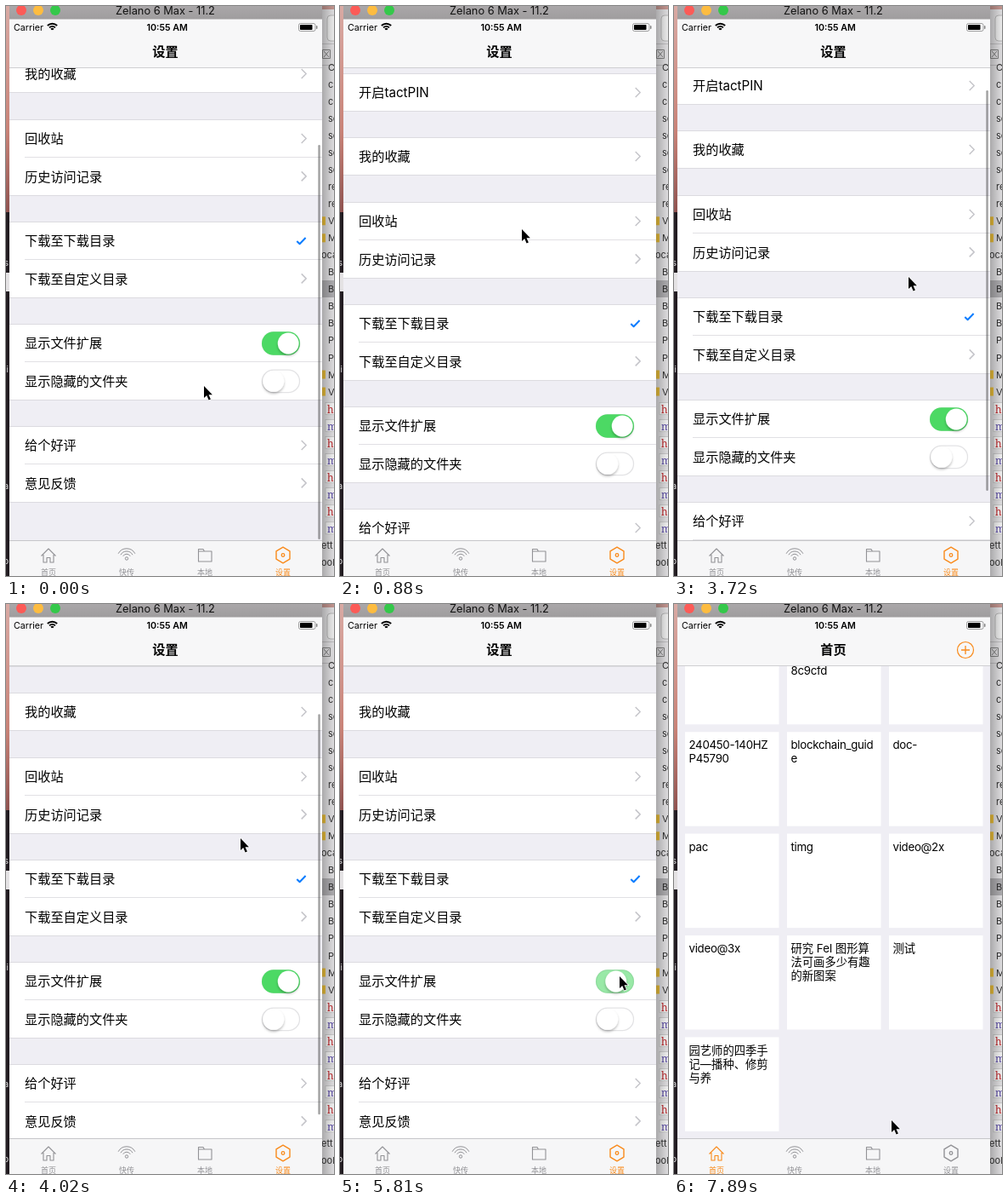
An HTML page for the animation above (8 s loop, 386 by 669 pixels).

```html
<!DOCTYPE html>
<html lang="zh-CN">
<head>
<meta charset="utf-8">
<title>设置</title>
<style>
html, body { margin: 0; width: 100%; height: 100%; overflow: hidden; background: #efeff4; }
svg { display: block; width: 386px; height: 669px; font-family: Inter, "Noto Sans CJK SC", "Noto Sans CJK", sans-serif; }
text { white-space: pre; }
.line { fill: none; stroke: currentColor; stroke-linejoin: round; }
</style>
</head>
<body>
<svg id="stage" viewBox="0 0 386 669">
  <defs>
    <linearGradient id="wall" x2="0" y2="1">
      <stop offset="0" stop-color="#d9aaa4"/><stop offset=".6" stop-color="#c98378"/><stop offset="1" stop-color="#8f5350"/>
    </linearGradient>
    <linearGradient id="shade">
      <stop offset="0" stop-opacity=".26"/><stop offset="1" stop-opacity=".04"/>
    </linearGradient>
    <linearGradient id="bar" x2="0" y2="1">
      <stop offset="0" stop-color="#aaa7a9"/><stop offset="1" stop-color="#9f9d9e"/>
    </linearGradient>
    <filter id="drop" x="-40%" y="-40%" width="180%" height="190%">
      <feDropShadow dx="0" dy="2" stdDeviation="1.6" flood-opacity=".28"/>
    </filter>
  </defs>
</svg>
<script>
const stage = document.getElementById('stage');
const ORANGE = '#f98a1a', GREY = '#929296', LOOP = 8000, TICK = 148.9;

const rect = (x, y, w, h, fill, extra = '') =>
  `<rect x="${x}" y="${y}" width="${w}" height="${h}" fill="${fill}" ${extra}/>`;
const circle = (x, y, r, fill, extra = '') =>
  `<circle cx="${x}" cy="${y}" r="${r}" fill="${fill}" ${extra}/>`;
const text = (x, y, size, str, extra = '') =>
  `<text x="${x}" y="${y}" font-size="${size}" ${extra}>${str}</text>`;
const line = (d, width, color = '') =>
  `<path class="line" d="${d}" stroke-width="${width}" ${color && `color="${color}"`}/>`;
const middle = 'text-anchor="middle"';

// Concentric arcs opening upwards
const arcs = (x, y, radii, angle, width) => radii.map(r => {
  const dx = r * Math.sin(angle), top = y - r * Math.cos(angle);
  return line(`M${x - dx} ${top}A${r} ${r} 0 0 1 ${x + dx} ${top}`, width);
}).join('');

function desktop() {
  let out = rect(0, 0, 5, 242, 'url(#wall)') + rect(0, 242, 5, 427, '#231d22')
    + rect(0, 313, 4, 22, '#e4e2e4');
  [['os', 305], ['ii', 430], ['a', 567], ['b', 655]].forEach(([s, y]) =>
    out += text(3, y, 10, s, 'fill="#ddd" text-anchor="end"'));

  out += rect(372, 0, 14, 669, '#e6e5e7') + rect(372, 0, 14, 4, '#c99a94')
    + rect(378, 11, 20, 30, '#f3f3f3', 'rx="4" stroke="#bbb"')
    + line('M372 44.5H386M372 69.5H386', 1, '#c4c3c5')
    + line('M372.5 51.5h9v10h-9zM374 53l6 7M380 53l-6 7', 1, '#858585')
    + rect(372, 322, 14, 20, '#b2b1b4');
  const names = 'C c cc sc so so so re re /V /M oca B B B B P P /M /V h m h m h m h m ett ool'.split(' ');
  names.forEach((name, i) => {
    const y = 76 + i * 20.03;
    if (name === 'h' || name === 'm') {
      out += rect(376, y - 11, 12, 14, '#fafafa', 'stroke="#bbb" stroke-width=".6"')
        + text(378, y + 1, 12, name, `fill="${name === 'h' ? '#c3272b' : '#5a4aa8'}" font-family="Noto Serif, serif"`);
    } else {
      const folder = name[0] === '/';
      if (folder) out += rect(370, y - 9, 6, 10, '#f2c53d');
      out += text(name.length > 2 ? 371 : 379, y, 11, folder ? name[1] : name, 'fill="#333"');
    }
  });
  return out + rect(372, 0, 14, 669, 'url(#shade)');
}

function toggle(y, id) {
  return `<g id="${id}">`
    + rect(301.5, y - 13.3, 44, 26.6, '#fff', 'rx="13.3" stroke="#e3e3e5" stroke-width="1.3"')
    + rect(301, y - 13.8, 45, 27.6, '#4cd964', 'rx="13.8" class="fill"')
    + circle(0, y, 12.4, '#fff', 'class="knob" filter="url(#drop)"') + '</g>';
}

function settings() {
  const groups = [
    [79, '开启tactPIN'], [154, '我的收藏'], [230, '回收站', '历史访问记录'],
    [350, '下载至下载目录', '下载至自定义目录'],
    [470, '显示文件扩展', '显示隐藏的文件夹'], [590, '给个好评', '意见反馈']
  ];
  let out = '';
  groups.forEach(([top, ...rows]) => {
    const height = Math.round(rows.length * 44.4);
    out += rect(4, top, 368, height, '#fff')
      + rect(4, top, 368, 1, '#dcdbe0') + rect(4, top + height, 368, 1, '#dcdbe0');
    rows.forEach((name, i) => {
      const y = top + 22.5 + 44.4 * i;
      out += text(22, y + 5.8, 15.2, name);
      if (i) out += rect(22, top + 44, 350, 1, '#e1e0e4');
      if (top === 470) out += toggle(y + .5, i ? 'hidden' : 'ext');
      else if (top === 350 && !i) out += line(`M342.3 ${y + .5}l3.3 3.3 7-7.3`, 2, '#0a7cff');
      else out += line(`M347.7 ${y - 5.5}l5.5 5.5-5.5 5.5`, 1.5, '#c5c5ca');
    });
  });
  return out;
}

function home() {
  const files = [
    [], ['', '', '8c9cfd'], [],
    ['240450-140HZ', 'P45790'], ['blockchain_guid', 'e'], ['doc-'],
    ['pac'], ['timg'], ['video@2x'],
    ['video@3x'], ['研究 Fel 图形算', '法可画多少有趣', '的新图案'], ['测试'],
    ['园艺师的四季手', '记—播种、修剪', '与养']
  ];
  return files.map((lines, i) => {
    const x = 13 + i % 3 * 120, y = 30.8 + Math.floor(i / 3) * 119.4;
    return rect(x, y, 110.5, 110.5, '#fff') + lines.map((str, k) =>
      text(x + 4.5, y + 20.2 + k * 16, 13.3, str, /^[ -~]+$/.test(str) ? 'letter-spacing="-.3"' : '')).join('');
  }).join('');
}

function chrome() {
  let out = rect(4, 15, 368, 57, '#f7f7f8') + rect(4, 72, 368, 1, '#cfcfd2')
    + rect(4, 0, 368, 15.5, 'url(#bar)');
  ['#fc5b57', '#fdbc40', '#34c84a'].forEach((fill, i) => out += circle(18 + 20 * i, 5, 6, fill));
  out += text(187.5, 10, 12.8, 'Zelano 6 Max - 11.2', middle + ' fill="#111"')
    + text(9, 29, 10.7, 'Carrier')
    + arcs(54.5, 29, [2, 5, 8.2], .76, 2)
    + text(189.7, 29, 10.7, '10:55 AM', middle + ' font-weight="600"')
    + rect(344.5, 20.5, 19.5, 9, 'none', 'rx="2" stroke="#888" stroke-width=".8"')
    + rect(346, 22, 14.5, 6, '#000', 'rx=".8"') + rect(365, 23, 1.5, 4, '#888', 'rx=".7"')
    + text(187.5, 59.4, 15.2, '', middle + ' font-weight="700" id="title"')
    + `<g id="add" color="${ORANGE}">` + line('M338 54h10M343 49v10', 1.3)
    + circle(343, 54, 9.5, 'none', 'stroke="currentColor" stroke-width="1.2"') + '</g>'
    + rect(4, 628, 368, 41, '#f6f6f7') + rect(4, 627, 368, 1, '#c6c6c9');

  const tabs = [
    ['首页', line('M41.5 645.5L50 637l8.5 8.5M44 644v9h4v-5.5h4v5.5h4v-9', 1.1)],
    ['快传', arcs(142, 648, [11.2, 8, 4.8], 1.08, 1) + circle(142, 648.5, 1.7, 'none', 'stroke="currentColor"')],
    ['本地', line('M226.5 652v-14.5h5.5l1.5 2.5h8.5v12zM226.5 640h7', 1.1)],
    ['设置', line('M326 635.2l8 4.7v9.2l-8 4.7-8-4.7v-9.2z', 1.4)
      + circle(326, 644.5, 1.8, 'none', 'stroke="currentColor" stroke-width="1.3"')]
  ];
  tabs.forEach(([name, icon], i) =>
    out += `<g class="tab">${icon}${text(50 + 92 * i, 668, 9, name, middle + ' fill="currentColor" font-weight="500"')}</g>`);
  return out;
}

stage.insertAdjacentHTML('beforeend', desktop() + rect(4, 0, 368, 669, '#efeef4')
  + `<g id="settings"><g id="list">${settings()}</g>${rect(367.3, 0, 2.5, 0, '#000', 'rx="1.2" id="scroller"')}</g>`
  + `<g id="home">${home()}</g>` + chrome()
  + '<path id="cursor" d="M0 0v14l3.2-3 2.4 5.6 2.3-1-2.4-5.4h4.4z" stroke="#fff" stroke-width="1.3" paint-order="stroke"/>');

// Keys: [tick, value, ...]
const cursorKeys = [
  [0, 233, 446], [1, 236, 472], [2, 237, 481], [3, 237, 478], [6, 214, 262], [8, 209, 133],
  [9, 220, 158], [10, 226, 168], [16, 226, 168], [17, 226, 170], [18, 226, 183], [19, 226, 183],
  [20, 247, 262], [21, 276, 334], [24, 276, 334], [25, 276, 318], [26, 276, 288], [27, 276, 275],
  [28, 279, 284], [30, 312, 390], [32, 329, 437], [41, 329, 437], [43, 250, 540], [45, 80, 640],
  [46, 51, 650], [49, 51, 650], [50, 220, 555], [52, 220, 555], [53, 256, 606]
];
const listKeys = [
  [0, 80, 1], [1, 122, 1], [2, 151, 1], [3, 169, 1], [4, 176, 1], [5, 177, .4], [6, 177, 0],
  [24, 177, 0], [25, 169, 1], [26, 140, 1], [27, 127, 1], [29, 127, 1], [31, 127, 0]
];
const switchKeys = [[38, 1], [39, .57], [40, .06], [41, 0]];

function at(keys, tick) {
  const next = keys.findIndex(k => k[0] > tick);
  if (next < 0) return keys[keys.length - 1].slice(1);
  if (!next) return keys[0].slice(1);
  const a = keys[next - 1], b = keys[next], p = (tick - a[0]) / (b[0] - a[0]);
  return a.slice(1).map((v, i) => v + (b[i + 1] - v) * p);
}

const $ = id => document.getElementById(id);
const show = (id, on) => $(id).setAttribute('display', on ? 'inline' : 'none');

function setSwitch(id, on) {
  const g = $(id);
  g.querySelector('.fill').setAttribute('opacity', on);
  g.querySelector('.knob').setAttribute('cx', 314.8 + 17.4 * on);
}

function draw() {
  const tick = Math.floor((performance.now() % LOOP + 14) / TICK);
  const isHome = tick >= 48;
  const [x, y] = at(cursorKeys, tick);
  const [scroll, alpha] = at(listKeys, tick);
  const top = 112 + (151 - scroll) * .72;

  $('cursor').setAttribute('transform', `translate(${x} ${y})`);
  $('list').setAttribute('transform', `translate(0 ${Math.round(scroll) - 177})`);
  $('scroller').setAttribute('y', top);
  $('scroller').setAttribute('height', Math.min(470, 626 - top));
  $('scroller').setAttribute('opacity', alpha * .36);
  setSwitch('ext', at(switchKeys, tick)[0]);
  setSwitch('hidden', 0);
  show('settings', !isHome);
  show('home', isHome);
  show('add', isHome);
  $('title').textContent = isHome ? '首页' : '设置';
  document.querySelectorAll('.tab').forEach((tab, i) =>
    tab.setAttribute('color', i === (isHome ? 0 : 3) ? ORANGE : GREY));
  requestAnimationFrame(draw);
}
draw();
</script>
</body>
</html>
```
